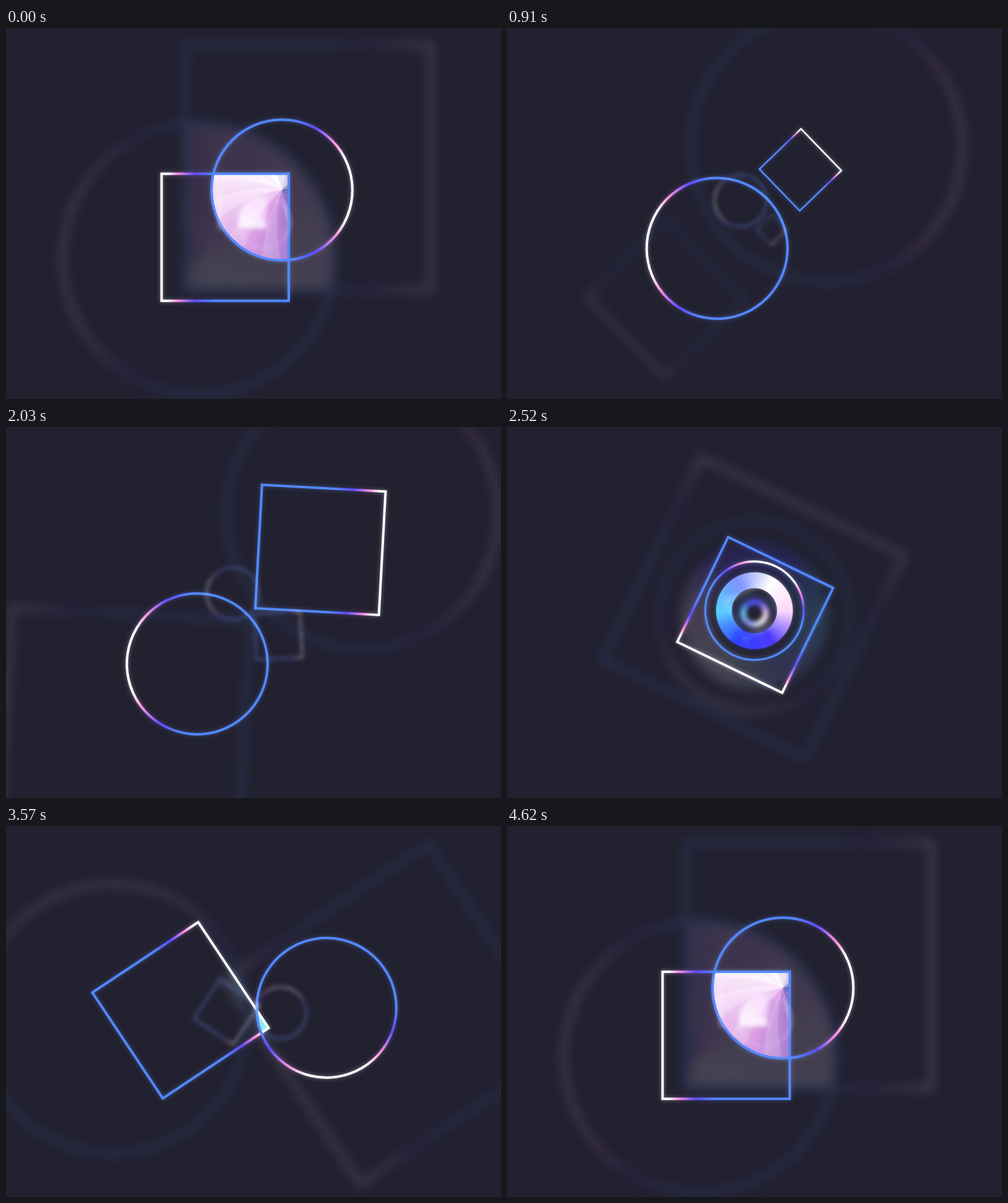
These frames come from a looping animation (800x600 px, 4.69 s). An HTML page with a canvas:

```html
<!DOCTYPE html>
<html>
<head>
<meta charset="utf-8">
<style>
html, body { margin: 0; width: 100%; height: 100%; overflow: hidden; background: #222130; }
canvas { display: block; }
</style>
</head>
<body>
<canvas id="stage" width="800" height="600"></canvas>
<script>
const LOOP = 4690, STEP = 70, W = 800, H = 600, TAU = Math.PI * 2;
const SIDE = 205.5, RADIUS = 113.8, COLLAPSED = 3080;
const stage = document.getElementById('stage').getContext('2d');
const layer = document.createElement('canvas');
layer.width = W;
layer.height = H;
const g = layer.getContext('2d');

const both = u => u < .5 ? 4 * u ** 3 : 1 - 4 * (1 - u) ** 3;
const out = u => 1 - (1 - u) ** 4;
const lerp = (a, b, k) => a + (b - a) * k;

// A value that starts somewhere and then makes moves of [begin, end, goal, ease]
function track(start, ...moves) {
  return t => moves.reduce((value, [begin, end, goal, ease = both]) => {
    const k = ease(Math.min(1, Math.max(0, (t - begin) / (end - begin))));
    return Array.isArray(value) ? value.map((v, i) => lerp(v, goal[i], k)) : lerp(value, goal, k);
  }, start);
}

// Cross over, come back, collapse in the middle, burst out sideways, settle
const journey = (rest, far, near, wide) => track(rest,
  [80, 1450, far], [1880, 2560, near], [2560, COLLAPSED, [0, 0]],
  [COLLAPSED, 3570, wide], [3570, 4130, rest, out]);

const motion = {
  circle: journey([46, -38], [-95, 87], [0, -3], [118, -6]),
  square: journey([-45.8, 38.4], [113, -106], [1, 4], [-118, -2]),
  radius: track(RADIUS, [2110, COLLAPSED, .4], [COLLAPSED, 3640, RADIUS]),
  side: track(SIDE, [200, 760, 90], [760, 1500, 200], [2340, COLLAPSED, 1], [COLLAPSED, 3500, SIDE]),
  circleTurn: track(0, [0, 1120, -180], [1826, COLLAPSED, 0], [COLLAPSED, 4357, 360]),
  squareTurn: track(0, [80, 1450, 180], [1826, COLLAPSED, 360], [COLLAPSED, 4130, 720]),
  ring: track(0, [2240, 2520, 1], [COLLAPSED, 3400, 0]),
  tint: track(0, [2240, 2520, 1], [COLLAPSED, 3360, 2], [3850, 4620, 3])
};

// Conic colours, evenly spaced clockwise from the right
const pink = ['5a64b0', '8a6cc4', 'dca0e4', 'fbe6fb', 'ffffff', 'd8cce8'];
const iris = ['ffd8fa', '4a38ff', '2a40ff', '58d0ff', '7a90ff', 'ffffff'];
const cyan = ['3c5a90', '4c88b0', '66ccdc', '88f0ff', 'ffffff', 'b0d8e8'];
const palettes = [pink, iris, cyan, pink];

function mix(a, b, k) {
  const part = (hex, i) => parseInt(hex.slice(i, i + 2), 16);
  return `rgb(${[0, 2, 4].map(i => Math.round(lerp(part(a, i), part(b, i), k)))})`;
}

function fanGradient(tint) {
  const i = Math.min(2, Math.floor(tint)), n = pink.length;
  const gradient = g.createConicGradient(0, 0, 0);
  for (let s = 0; s <= n; s++) {
    gradient.addColorStop(s / n, mix(palettes[i][s % n], palettes[i + 1][s % n], tint - i));
  }
  return gradient;
}

function outline(path, from, to, scale) {
  const gradient = g.createLinearGradient(from, 0, to, 0);
  [[0, '#fff'], [.05, '#fff'], [.12, '#ff94de'], [.26, '#5f4cff'], [.42, '#5288ff']]
    .forEach(([at, color]) => gradient.addColorStop(at, color));
  g.strokeStyle = gradient;
  g.lineWidth = 4 * Math.sqrt(scale);
  g.stroke(path);
}

function placed([x, y], turn, draw) {
  g.save();
  g.translate(x, y);
  g.rotate(turn * TAU / 360);
  draw();
  g.restore();
}

function drawBlades(strength) {
  const count = 22, size = 260;
  const at = (angle, r) => [Math.cos(angle) * r, Math.sin(angle) * r];
  g.globalAlpha = strength;
  for (let i = 0; i < count; i++) {
    const a = i / count * TAU, b = a + TAU / count * .9;
    g.beginPath();
    g.moveTo(0, 0);
    g.quadraticCurveTo(...at(a + .5, size * .3), ...at(a, size));
    g.lineTo(...at(b, size));
    g.quadraticCurveTo(...at(b + .5, size * .3), 0, 0);
    g.fillStyle = i % 2 ? 'rgba(255,255,255,.14)' : 'rgba(150,80,200,.05)';
    g.fill();
  }
}

function drawOverlap(p, square) {
  g.save();
  const area = new Path2D();
  area.addPath(square, new DOMMatrix().translate(...p.square).rotate(p.squareTurn));
  g.clip(area);
  g.translate(...p.circle);
  const lens = new Path2D(), hole = p.radius * .46 * p.ring;
  lens.arc(0, 0, p.radius * (1 - .22 * p.ring), 0, TAU);
  lens.moveTo(hole, 0);
  lens.arc(0, 0, hole, 0, TAU);
  g.clip(lens, 'evenodd');
  g.fillStyle = fanGradient(p.tint);
  g.fillRect(-W, -H, W * 2, H * 2);
  drawBlades(1 - .8 * p.ring);
  g.restore();
}

function drawShapes(p) {
  const half = p.side / 2;
  const square = new Path2D(), circle = new Path2D();
  square.rect(-half, -half, p.side, p.side);
  circle.arc(0, 0, p.radius, 0, TAU);

  g.clearRect(0, 0, W, H);
  g.save();
  g.translate(W / 2, H / 2);
  drawOverlap(p, square);
  placed(p.square, p.squareTurn, () => outline(square, -half, half, p.side / SIDE));
  placed(p.circle, p.circleTurn, () => outline(circle, p.radius, -p.radius, p.radius / RADIUS));
  g.restore();
}

function copy(scaleX, scaleY, blur, alpha, blend = 'source-over') {
  stage.save();
  stage.translate(W / 2, H / 2);
  stage.scale(scaleX, scaleY);
  stage.globalAlpha = alpha;
  stage.globalCompositeOperation = blend;
  if (blur) stage.filter = `blur(${blur}px)`;
  stage.drawImage(layer, -W / 2, -H / 2);
  stage.restore();
}

function frame(now) {
  const t = Math.floor(now % LOOP / STEP) * STEP;
  const pose = {};
  for (const name in motion) pose[name] = motion[name](t);
  drawShapes(pose);

  stage.fillStyle = '#222130';
  stage.fillRect(0, 0, W, H);
  copy(-1.93, -1.93, 8.5, .16);
  copy(1, 1, 3, .35, 'lighter');
  copy(1, 1, 0, 1);
  copy(.37, -.37, 3.6, .9, 'screen');
  requestAnimationFrame(frame);
}
requestAnimationFrame(frame);
</script>
</body>
</html>
```
